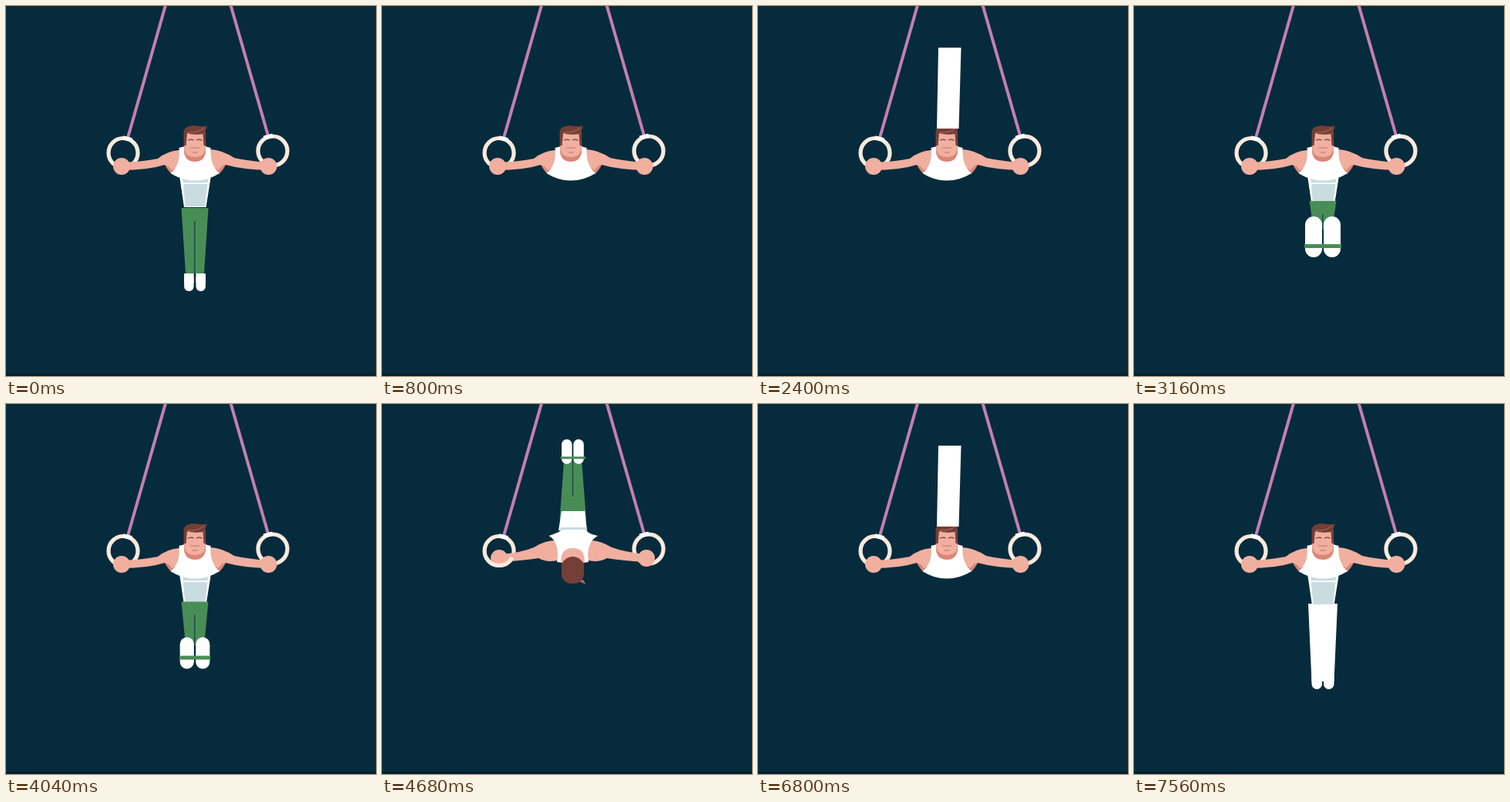
An HTML page that plays this animation: 480 px wide and 480 px high, repeating every 7.6 s.

```html
<!DOCTYPE html>
<html lang="en">
<head>
<meta charset="utf-8">
<title>Gymnast on the rings</title>
<style>
html, body { margin: 0; width: 100%; height: 100%; overflow: hidden; background: #062b3d; }
svg { display: block; width: 100vw; height: 100vh; }
.skin { fill: #f0af9f; } .shade { fill: #dc8675; } .hair { fill: #743f36; }
.white { fill: #fff; } .pale { fill: #c9dcdf; } .green { fill: #498d56; }
.line { fill: none; stroke: #743f36; stroke-width: 1.1; }
.ring { fill: none; stroke: #fbeadc; stroke-width: 5.2; }
.rope { stroke: #c47fb0; stroke-width: 4; }
.seam { stroke: #123f42; stroke-width: 1.2; }
</style>
</head>
<body>
<svg viewBox="0 0 480 480">
  <rect width="480" height="480" fill="#062b3d"/>
  <rect y="477" width="480" height="3" fill="#03202f"/>
  <path class="rope" d="M207 -1L158 171M291.500 -1L340 168"/>
  <circle class="ring" cx="152" cy="190.500" r="19"/>
  <circle class="ring" cx="346" cy="188" r="19"/>
  <g id="clips" class="white">
    <rect x="151.500" y="169.500" width="12" height="5.500" transform="rotate(15 157 172)"/>
    <rect x="334" y="167" width="12" height="5.500" transform="rotate(-14 340 169)"/>
  </g>

  <g id="front">
    <g id="backLegs"></g>
    <g id="torso">
      <path class="white" d="M225 220H266L259.500 261H231Z"/>
      <path class="pale" d="M229 222H262.500L258 260H232.500Z"/>
      <path class="white" d="M230 229.200H262V231H230Z"/>
    </g>
    <path class="skin" d="M225 187Q209 188 197 198Q178 202 150 203V213Q184 213 206 206L215 217L232 205Z
      M265 186Q281 187 296 197Q315 201 340 203V213Q306 212 285 206L276 217L258 205Z"/>
    <path class="shade" d="M206 206Q211 207 215 213L222 209L215 218Q211 215 206 206ZM285 206Q279 207 276 213L269 209L276 218Q281 214 285 206Z"/>
    <circle class="skin" cx="150" cy="208" r="11"/>
    <circle class="skin" cx="340.500" cy="208" r="11"/>
    <path class="white" d="M224.500 184L232 182H258L265.500 184Q264 206 277 217Q262 226.500 245 226.500Q228 226.500 213.500 217Q227 206 224.500 184Z"/>
    <path class="shade" d="M231 181H259V190Q257 202 245 202Q233 202 231 190Z"/>
    <path class="skin" d="M231.500 163H258.500V187Q256 196 245 196Q234 196 231.500 187Z"/>
    <path class="hair" d="M230.500 181V163Q232 155 245 155Q253 157 261 155.500Q260 159 258.500 162L259.500 181H256.500L255.500 166Q244 168 235 165L233.500 181Z"/>
    <path d="M236 164Q249 165 257 158" fill="none" stroke="#b8685c" stroke-width="1"/>
    <path class="line" d="M236 174.500Q239 172 243.500 174M247 174Q251 172 254.500 174.500"/>
    <path d="M239 184H251M242 190H248" fill="none" stroke="#bd7063" stroke-width="1"/>
    <g id="frontLegs"></g>
  </g>

  <g id="inverted">
    <g id="upLegs"></g>
    <g id="upTorso"></g>
    <path class="skin" d="M229 177Q212 176 197 186Q181 193 152 195V205Q184 203 203 200Q216 207 230 202Z
      M267 177Q282 176 298 186Q315 192 341 195V205Q310 203 292 200Q279 207 265 202Z"/>
    <path class="white" d="M216.500 171Q231 166 234 163H263Q267 168 280 171Q264 180 268 205L261 206H235L227 205Q231 180 216.500 171Z"/>
    <path class="skin" d="M232.500 206Q231 187 247.500 187Q264 187 262.500 206Z"/>
    <path class="hair" d="M233 207Q239 198 247.500 198Q256 198 262 207V223Q259 233 247.500 233Q236 233 233 223Z"/>
    <path d="M256 230L261 228L264.500 234Z" fill="#b8685c"/>
    <circle class="skin" cx="152" cy="200" r="11"/>
    <circle id="rightHand" class="skin" cx="343" cy="200" r="11"/>
    <path class="ring" d="M135 199A19 19 0 0 0 169 199"/>
  </g>
</svg>
<script>
const LOOP = 7600;
// One turn: legs forward, cut to inverted, highest, legs fold back, cut to front, hanging again.
const turns = [
  [160, 400, 560, 600, 720, 960],
  [1000, 1240, 1480, 1880, 2400, 2680],
  [2960, 3280, 3440, 3480, 3640, 3840],
  [3920, 4160, 4400, 4480, 4840, 5120],
  [5680, 5680, 5860, 5900, 6080, 6280],
  [6320, 6520, 6620, 6640, 6800, 7000],
  [7040, 7240, 7320, 7340, 7400, 7540]
].map(([forward, flip, peak, fold, face, hang]) => ({ forward, flip, peak, fold, face, hang }));

const $ = id => document.getElementById(id);
const clamp = x => Math.max(0, Math.min(1, x));
const lerp = (a, b, k) => a + (b - a) * k;
const part = (t, a, b) => clamp((t - a) / (b - a));
const show = (id, on) => $(id).setAttribute('display', on ? 'inline' : 'none');
const rect = (cls, x, y, w, h, r = 0) =>
  `<rect class="${cls}" x="${x}" y="${y}" width="${w}" height="${h}" rx="${r}"/>`;
const quad = (cls, l1, r1, y1, l2, r2, y2) =>
  `<path class="${cls}" d="M${l1} ${y1}H${r1}L${r2} ${y2}H${l2}Z"/>`;
const seam = (x, y1, y2) => `<path class="seam" d="M${x} ${y1}V${y2}"/>`;

function hangingLegs(u) {
  const k = clamp(u);
  const waist = lerp(262, 253, k);
  const bottom = 370 - 44 * u;
  const top = 347 - 74 * u;
  const width = lerp(12.5, 22, k);
  const hem = Math.max(waist + 8, lerp(347, 290, k));
  const gap = lerp(1.4, 1, k);
  let out = quad('green', 227.5, 262.5, waist, 233, 257, hem) +
    seam(244.8, lerp(279, 270, k), hem);
  for (const x of [245 - gap - width, 245 + gap])
    out += rect('white', x, top, width, bottom - top, width / 2) +
      (u < 0.05 ? rect('white', x, top, width, 12) : '');
  if (u > 0.25) out += rect('green', 245 - width - 2, bottom - 17, width * 2 + 4, 5);
  return out;
}

function whiteLegs(v) {
  const waist = lerp(159, 259, v);
  const feet = lerp(54, 360, v);
  let out = quad('white', lerp(232, 226, v), lerp(260.5, 264, v), waist,
    lerp(234, 230.5, v), lerp(263.5, 259.5, v), feet);
  if (v > 0.7)
    out += rect('white', 230.5, feet - 14, 13.5, 24, 6.7) + rect('white', 246, feet - 14, 13.5, 24, 6.7);
  return out;
}

function drawInverted(t, turn) {
  const drop = 12 * (1 - part(t, turn.flip, turn.peak)) ** 2;
  const q = part(t, turn.fold, turn.face);
  const top = 18 + drop + 50 * q;
  const hip = 127 + drop + 42 * q;
  const chestTop = Math.min(150, 129 + drop + 18 * q);
  const cuff = top + 31;
  $('upLegs').innerHTML =
    quad('green', 236, 259, cuff - 3, 230.5, 265, hip) +
    seam(247.5, cuff - 8, hip - 18 - 22 * q) +
    rect('white', 233, top, 13.5, 32, 6.7) +
    rect('white', 248.3, top, 13.5, 32, 6.7) +
    rect('green', 231.5, top + 22.5, 32.5, 3);
  $('upTorso').innerHTML =
    quad('white', 234 - 2 * q, 262 + 2 * q, chestTop, 229, 266, 164) +
    quad('pale', 232, 265, 160, 230, 267, 167);
  $('rightHand').setAttribute('cx', 343 - drop / 3);
}

function drawFront(t, last, next) {
  const v = last ? 1 - (1 - part(t, last.face, last.hang)) ** 2 : 1;
  const white = last && t < last.hang + 60;
  const waist = lerp(159, 259, v);
  const overhead = white && v < 0.1;
  const u = next ? Math.max(0, (t - next.forward) / 200) : 0;
  $('backLegs').innerHTML = white && !overhead ? whiteLegs(v) : '';
  $('frontLegs').innerHTML = overhead ? whiteLegs(v) : white ? '' : hangingLegs(u);
  show('torso', !white || waist > 226);
}

function draw(t) {
  const turn = turns.find(s => t >= s.flip && t < s.face);
  show('inverted', turn);
  show('front', !turn);
  if (turn) drawInverted(t, turn);
  else drawFront(t, turns.filter(s => t >= s.face).pop(), turns.find(s => t < s.flip));
}

const start = performance.now();
function tick() {
  const t = (performance.now() - start) % LOOP;
  draw(Math.floor(t / 40) * 40);
  requestAnimationFrame(tick);
}
tick();
</script>
</body>
</html>
```
